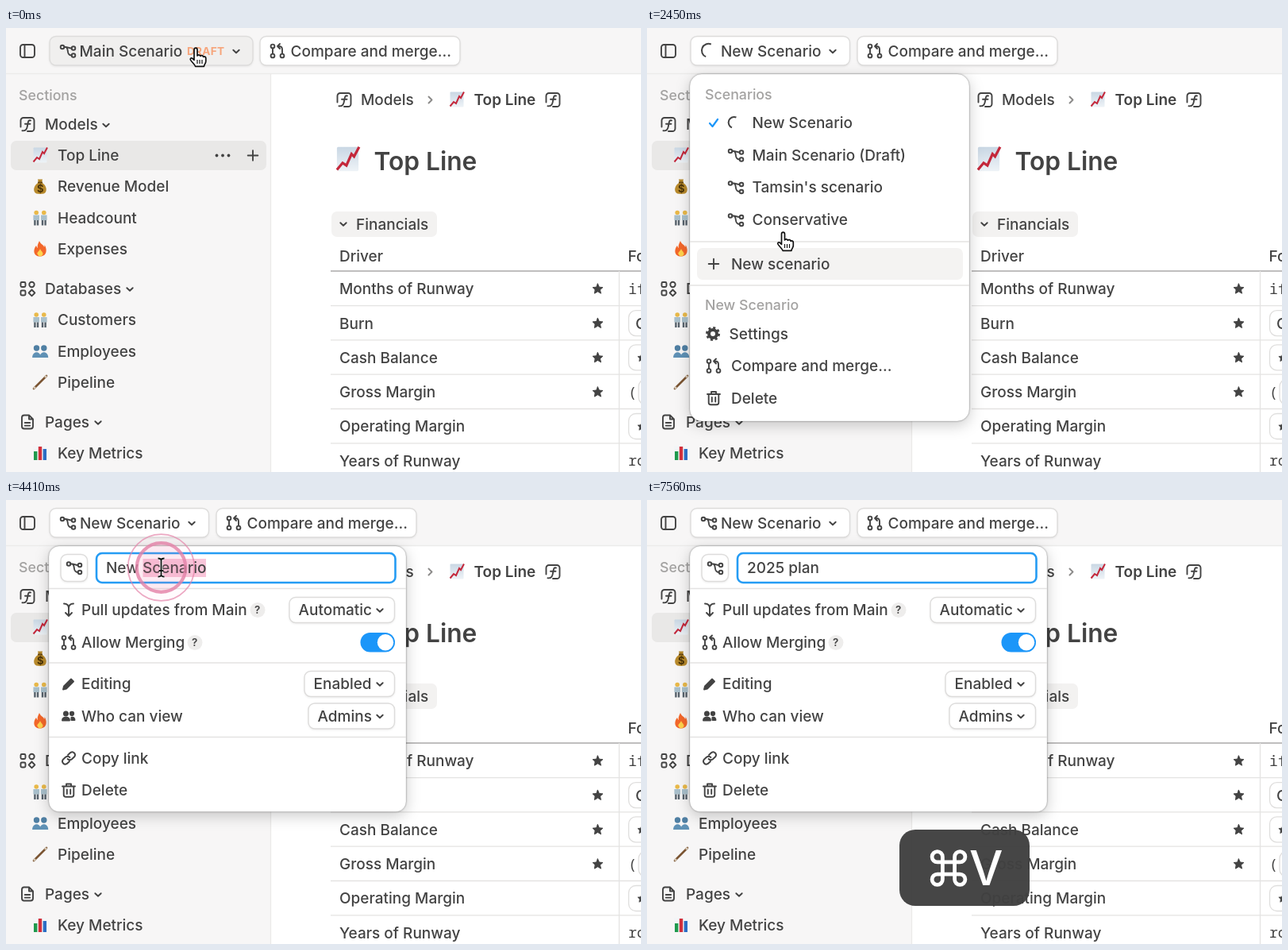
An HTML page for the animation above (8000 ms loop, 800x559 px).

```html
<!DOCTYPE html>
<html lang="en">
<head>
<meta charset="utf-8">
<title>Scenario menu</title>
<style>
  html, body { margin: 0; width: 100%; height: 100%; overflow: hidden; background: #fff; }
  svg { display: block; }
  text { font-family: Inter, sans-serif; font-weight: 500; font-optical-sizing: none; fill: #434343; white-space: pre; }
  .mono { font-family: "Noto Sans Mono", monospace; }
  .icon { fill: none; stroke: #434343; stroke-width: 1.9; stroke-linecap: round; stroke-linejoin: round; }
  .panel { fill: #fff; stroke: #00000018; filter: drop-shadow(0 0 1px #0005) drop-shadow(0 5px 9px #0003); }
  .button { fill: #fff; stroke: #dddcdb; stroke-width: 1.4; filter: drop-shadow(0 1px 1px #0001); }
</style>
</head>
<body>
<svg id="stage" width="800" height="559" viewBox="0 0 800 559"></svg>
<script>
const LOOP = 8000;
const CLICKS = [110, 1890, 4120, 4290, 4470];
const HOME = [240, 28], NEW_ROW = [172.5, 260], NAME_FIELD = [195.5, 85];

// Drawing helpers: text is placed by its left edge and the middle of its capitals.
const text = (x, y, s, size = 19, attrs = '') =>
  `<text x="${x}" y="${y + size * .364}" font-size="${size}" ${attrs}>${s}</text>`;
const label = (x, y, s) => text(x, y, s, 17.75, 'style="fill:#a3a2a1"');
const rect = (x, y, w, h, r, attrs) =>
  `<rect x="${x}" y="${y}" width="${w}" height="${h}" rx="${r}" ${attrs}/>`;
const line = (x1, y1, x2, y2, color = '#e4e3e2') =>
  `<path d="M${x1} ${y1}L${x2} ${y2}" stroke="${color}" stroke-width="1.3"/>`;
const dot = (x, y, r, attrs = '') => `<circle cx="${x}" cy="${y}" r="${r}" ${attrs}/>`;
const path = (d, attrs = '') => `<path d="${d}" ${attrs}/>`;
const at = (x, y, body, scale = 1) =>
  `<g transform="translate(${x} ${y}) scale(${scale})">${body}</g>`;
const group = (id, body) => `<g id="${id}">${body}</g>`;

const SOLID = 'fill="#434343"';
const ICONS = {
  panel: rect(-9, -8, 18, 16, 3.5, '') + path('M-3.5-8V8'),
  branch: dot(-7, -5, 2.3) + dot(7, -3.5, 2.3) + dot(7, 5.5, 2.3) +
    path('M-4.7-5H-3C0-5 1-3.5 4.5-3.5M-3-5C2-5-3 5.5 4.5 5.5'),
  merge: dot(-6, -6, 2.4) + dot(-6, 6, 2.4) + dot(6, 6, 2.4) +
    path('M-6-3.5V3.5M6 3.5V-2Q6-6 2-6H0M3-9L0-6L3-3'),
  formula: path('M-8.5 3V-5A3.5 3.5 0 0 1-5-8.5H5A3.5 3.5 0 0 1 8.5-5V5A3.5 3.5 0 0 1 5 8.5H0') +
    path('M4-5C1-6 .8-3 .3 0C-.3 4-1 8.6-6.5 7.8M-3-.8H3.5'),
  shapes: rect(-8.5, -8, 6, 6, 1.5, '') + dot(5.5, -5, 3.2) + rect(-8.5, 2.5, 6, 6, 1.5, '') +
    path('M5.5 1.5L9.3 5.5L5.5 9.3L1.7 5.5Z'),
  page: path('M2-8.5H-4Q-7-8.5-7-5.5V5.5Q-7 8.5-4 8.5H4Q7 8.5 7 5.5V-3.5ZM2-8.5V-3.5H7M-3.2 1H3.2M-3.2 4.6H3.2'),
  down: path('M-3.7-1.8L0 1.8L3.7-1.8'),
  right: path('M-2-4L2 0L-2 4', 'stroke="#8b8a89"'),
  plus: path('M-6.3 0H6.3M0-6.3V6.3'),
  check: path('M-5 .5L-1.5 4.5L5-4.5', 'stroke="#1b96f9" stroke-width="2.2"'),
  gear: dot(0, 0, 5, 'stroke-width="4"') +
    dot(0, 0, 7.5, 'stroke-width="3" stroke-dasharray="2.95 2.94" stroke-linecap="butt"'),
  trash: path('M-8-5H8M-3-5V-8H3V-5M-6.3-5V5.5Q-6.3 8.3-3.5 8.3H3.5Q6.3 8.3 6.3 5.5V-5M-2.2-1V4.5M2.2-1V4.5'),
  link: path('M-1-4L2.5-7.2A3.7 3.7 0 0 1 7.4-2L4 1.2Q1 3.4-1.4 1M1 4L-2.5 7.2A3.7 3.7 0 0 1-7.4 2L-4-1.2Q-1-3.4 1.4-1'),
  pencil: path('M-7 7L-6 3L3-6L6-3L-3 6Z', SOLID),
  people: dot(-3.5, -3, 2.6, SOLID) + dot(4, -3, 2.2, SOLID) +
    path('M-8 5.5C-8 .5 1 .5 1 5.5ZM3.4 5V2Q7.5 1 7.5 5Z', SOLID),
  pull: path('M-6-8C-2-8 0-6 0-2V7M6-8C2-8 0-6 0-2M-4 3.5L0 7.5L4 3.5'),
  star: path('M0-6.3L1.9-2.1L6.4-1.7L3 1.4L4 5.9L0 3.5L-4 5.9L-3-1.7L-3 1.4L-6.4-1.7L-1.9-2.1Z', SOLID + ' stroke-width="1"'),
};
const icon = (name, x, y, scale = 1) => at(x, y, `<g class="icon">${ICONS[name]}</g>`, scale);

const person = x => dot(x, -6.5, 2.8, 'fill="#e9b949"') +
  path(`M${x - 3.8}-3.5H${x + 3.8}V3H${x - 3.8}Z`, 'fill="#a9c0cc"') +
  path(`M${x - 1.8} 3V9.5M${x + 1.8} 3V9.5`, 'stroke="#56616b" stroke-width="2.4"');
const EMOJI = {
  chart: rect(-8.5, -9.5, 17, 19, 1, 'fill="url(#sky)"') +
    path('M-8.5 8.5L-4 3L-1 5L3-4L5-2L9-9.5', 'fill="none" stroke="#c4283b" stroke-width="2"'),
  money: path('M-3-9H3L2-5C7-2 9 3 7 7Q6 9.5 0 9.5T-7 7C-9 3-7-2-2-5Z', 'fill="#b88a2c"') +
    path('M-3-5H3', 'stroke="#6d4c13" stroke-width="2"') +
    text(-4, 2.6, '$', 13, 'style="fill:#4b3409;font-weight:700"'),
  pair: person(-4.8) + person(4.8),
  fire: path('M-1-10C1-5 5-5 5-2Q6-3 5.5-5C9 0 9 9.5 0 9.5S-9 1-5-4Q-4-1-3-1C-4-5-2-7-1-10Z', 'fill="#f3672a"') +
    path('M0 0C1 3 4 4 3.5 7Q2 9.5 0 9.5T-3.6 6.5C-4 4-1 3 0 0Z', 'fill="#ffd34d"'),
  busts: ['-4.5', '4.8'].map(x => dot(x, -4, 3.7, 'fill="#4f7fa3"') +
    path('M-5.4 8C-5.4-1 5.4-1 5.4 8Z', `transform="translate(${x} 0)" fill="#5f91b5"`)).join(''),
  stick: path('M-8 8L8-8', 'stroke="#7b5533" stroke-width="2.6" stroke-linecap="round"') +
    path('M-8 8L-6 6M6-6L8-8', 'stroke="#d9cbb8" stroke-width="2.4"'),
  bars: rect(-9, -9, 18, 18, 1, 'fill="#f3f5f7"') + rect(-8, -2, 4.4, 11, 0, 'fill="#1f9a4d"') +
    rect(-2.2, -8, 4.4, 17, 0, 'fill="#d2303c"') + rect(3.6, -5, 4.4, 14, 0, 'fill="#2c6ec4"'),
};
const emoji = (name, x, y, scale = 1) => at(x, y, EMOJI[name], scale);

function sidebar() {
  const heading = (y, name, s, chevron) =>
    icon(name, 27, y) + text(49, y, s) + icon('down', chevron, y + 1);
  const items = [
    ['chart', 160, 'Top Line'], ['money', 199.5, 'Revenue Model'], ['pair', 239, 'Headcount'],
    ['fire', 278, 'Expenses'], ['pair', 367.5, 'Customers'], ['busts', 407, 'Employees'],
    ['stick', 446, 'Pipeline'], ['bars', 535, 'Key Metrics'],
  ];
  return rect(0, 0, 800, 57, 0, 'fill="#f7f6f6"') + rect(0, 57, 333, 502, 0, 'fill="#f7f6f6"') +
    line(0, 57.5, 800, 57.5, '#ecebea') + line(333.5, 58, 333.5, 559, '#ebeae9') +
    icon('panel', 27, 29) + label(16, 85, 'Sections') +
    rect(6, 142, 322, 37, 7, 'fill="#e9e8e7"') +
    heading(121.5, 'formula', 'Models', 126) + heading(328, 'shapes', 'Databases', 156) +
    heading(496, 'page', 'Pages', 116) +
    items.map(([name, y, s]) => emoji(name, 43, y) + text(65, y, s)).join('') +
    [265.5, 273, 280.5].map(x => dot(x, 160.5, 1.9, SOLID)).join('') + icon('plus', 311, 160.5);
}

function content() {
  const drivers = ['Months of Runway', 'Burn', 'Cash Balance', 'Gross Margin', 'Operating Margin', 'Years of Runway'];
  const rowY = i => 328.3 + 43.3 * i;
  const chip = (x, y, body) => rect(x, y - 16, 60, 32, 9, 'fill="#fff" stroke="#dfdedd" stroke-width="1.3"') + body;
  const mono = (y, s) => text(784, y, s, 18, 'class="mono"');
  const formulas = [
    mono(rowY(0), 'if('),
    chip(784.5, rowY(1), text(793, rowY(1), 'Cash')),
    chip(784.5, rowY(2), icon('star', 801, rowY(2), .8)),
    mono(rowY(3), '(') + chip(797, rowY(3), ''),
    chip(784.5, rowY(4), icon('star', 801, rowY(4), .8)),
    mono(rowY(5), 'round('),
  ];
  return icon('formula', 426, 90.5) + text(447, 90.5, 'Models') + icon('right', 534.5, 90.5) +
    emoji('chart', 568, 90) + text(589.5, 90.5, 'Top Line', 19, 'style="font-weight:600"') +
    icon('formula', 689, 90.5) +
    emoji('chart', 430.5, 165, 1.6) + text(463.5, 167, 'Top Line', 31.7, 'style="font-weight:600"') +
    rect(410, 231, 133, 32, 7, 'fill="#f3f2f1"') + icon('down', 425, 247) + text(441, 247.5, 'Financials') +
    text(420, 287, 'Driver') + text(783.5, 287, 'Formula') +
    line(409, 306, 800, 306, '#aaa9a8') + line(772.5, 306, 772.5, 559) +
    drivers.map((s, i) => text(420, rowY(i), s) + formulas[i] + (i < 4 ? icon('star', 745.5, rowY(i)) : '') +
      line(409, rowY(i) + 21.3, 800, rowY(i) + 21.3)).join('');
}

const spinner = (x, y, r) => at(x, y,
  `<path class="spin" d="M${r * .2} ${-r}A${r} ${r} 0 0 1 ${r * .2} ${r}" fill="none" stroke="#434343" stroke-width="2"/>`);

function toolbar() {
  const compare = x => rect(x, 10.5, 252, 36.5, 8, 'class="button"') +
    icon('merge', x + 22, 29) + text(x + 38.5, 29, 'Compare and merge...');
  return group('barMain', rect(55, 10.5, 256, 36.5, 8, 'class="button" id="barButton"') +
      icon('branch', 78, 29) + text(92.5, 29, 'Main Scenario') +
      text(228, 29.2, 'DRAFT', 13.6, 'style="fill:#f6a57c;font-weight:700" letter-spacing=".3"') +
      icon('down', 290, 29.5) + compare(320)) +
    group('barNew', rect(55, 10.5, 200.5, 36.5, 8, 'class="button"') +
      group('barSpinner', spinner(79, 29, 8.5)) + group('barIcon', icon('branch', 78, 29)) +
      text(93, 29, 'New Scenario') + icon('down', 234, 29.5) + compare(265));
}

const row = (name, y, s, x = 84, textX = 106) => icon(name, x, y) + text(textX, y, s);
const scenario = (y, s) => row('branch', y, s, 112, 132.5);
const divider = (y, right) => line(54, y, right, y);
const highlight = (y, id = '') => rect(63, y - 20, 335, 40, 7, `fill="#f4f3f2" ${id}`);

function scenarioMenu() {
  return rect(54, 58, 352, 436, 15, 'class="panel"') + highlight(119, 'id="hover"') +
    label(73, 83.5, 'Scenarios') + icon('check', 84, 119.5) +
    scenario(119.5, 'Main Scenario (Draft)') + scenario(160, "Tamsin's scenario") + scenario(200.5, 'Conservative') +
    divider(228, 406) + row('plus', 256, 'New scenario') + divider(283.5, 406) +
    label(73, 308, 'Main Scenario (Draft)') + row('gear', 344, 'Settings', 83, 103.5) +
    row('branch', 384.5, 'Save draft as...') + row('merge', 425, 'Compare and merge...') +
    row('trash', 465.5, 'Discard draft');
}

function createdMenu() {
  return rect(54, 58, 352, 437, 15, 'class="panel"') + highlight(297) +
    label(73, 83.5, 'Scenarios') + icon('check', 84, 119.5) + spinner(111, 119.5, 7) +
    text(132.5, 119.5, 'New Scenario') + scenario(160, 'Main Scenario (Draft)') +
    scenario(200.5, "Tamsin's scenario") + scenario(241.5, 'Conservative') +
    divider(269, 406) + row('plus', 297, 'New scenario') + divider(324, 406) +
    label(73, 349, 'New Scenario') + row('gear', 385, 'Settings', 83, 103.5) +
    row('merge', 425.5, 'Compare and merge...') + row('trash', 466, 'Delete');
}

function settings() {
  const entry = (name, y, s) => row(name, y, s, 79, 95);
  const help = (x, y) => dot(x, y, 9.5, 'fill="#eeedec"') +
    text(x - 4, y, '?', 13.5, 'style="font-weight:600"');
  const select = (x, y, s) => rect(x, y - 16, 489.5 - x, 32, 8, 'class="button"') +
    text(x + 11.5, y, s) + icon('down', 471, y + .5);
  return rect(54, 58, 450, 334.5, 13, 'class="panel"') +
    rect(69, 68.5, 33.5, 34, 8, 'class="button"') + icon('branch', 86, 85.5) +
    rect(114, 67.5, 376, 36.5, 7, 'fill="#fff" stroke="#e4e3e2"') +
    rect(114, 67, 376.5, 37, 7, 'id="focus" fill="none" stroke="#259cf4" stroke-width="2.6"') +
    rect(0, 74, 0, 23, 0, 'id="selection" fill="#f9c5d9"') +
    text(126, 85.5, '', 19, 'id="fieldName"') + rect(0, 74, 1.7, 23, 0, 'id="caret" fill="#434343"') +
    divider(111.5, 504) + entry('pull', 138.5, 'Pull updates from Main') + help(317, 138.5) + select(357, 138.5, 'Automatic') +
    entry('merge', 179.5, 'Allow Merging') + help(238, 179.5) +
    rect(446.5, 167, 43.5, 24.5, 12.2, 'fill="#1b96f9"') + dot(478, 179.2, 10.2, 'fill="#fff"') +
    divider(205, 504) + entry('pencil', 231.5, 'Editing') + select(376, 231.5, 'Enabled') +
    entry('people', 272, 'Who can view') + select(381, 272, 'Admins') +
    divider(298.5, 504) + entry('link', 325, 'Copy link') + entry('trash', 365.5, 'Delete');
}

const keys = () => rect(318, 415, 164, 96, 20, 'fill="#404040f7"') +
  at(380, 463.5, path('M-8-15A7 7 0 1 0-15-8H15A7 7 0 1 0 8-15V15A7 7 0 1 0 15 8H-15A7 7 0 1 0-8 15Z',
    'fill="none" stroke="#fff" stroke-width="5"'), .95) +
  text(406, 463, 'V', 60, 'style="fill:#fff"');

const beam = 'M-4-11.5Q0-11.5 0-9Q0-11.5 4-11.5M0-9V9M-4 11.5Q0 11.5 0 9Q0 11.5 4 11.5M-2.5 4H2.5';
const cursor = () =>
  group('hand', path('M-3-.5C-3-3.8 1-3.8 1-.5V7C1.5 5.4 4.5 5.6 4.8 7.4C5.6 6 8.4 6.4 8.6 8.4C9.6 7.4 11.8 8.2 11.8 10V13.8C11.8 17 9.6 17.5 9.4 20.4H-1.4C-2 18-5 16-7.4 12.4C-8.6 10.4-6.6 9-5 10.4L-3 12.4Z',
    'fill="#fff" stroke="#111" stroke-width="1.7" stroke-linejoin="round"') +
    path('M1 12V17M4 12V17M7 12V17', 'stroke="#111" stroke-width="1.2"')) +
  group('arrow', path('M.5-1V17.5L4.6 13.7L7.4 20.6L10.6 19.3L7.8 12.6H13.5Z', 'fill="#111" stroke="#fff" stroke-width="1.5"')) +
  group('beam', path(beam, 'fill="none" stroke="#fff" stroke-width="3.6"') +
    path(beam, 'fill="none" stroke="#111" stroke-width="1.8"'));

const stage = document.getElementById('stage');
stage.innerHTML = '<linearGradient id="sky" x2="0" y2="1"><stop stop-color="#c9d7e4"/><stop offset="1" stop-color="#eef3f7"/></linearGradient>' +
  sidebar() + content() + toolbar() + group('menu', scenarioMenu()) + group('created', createdMenu()) +
  group('settings', settings()) + CLICKS.map(() => dot(0, 0, 0, 'class="ring" fill="#ea7fa8" stroke="#e482a8"')).join('') +
  group('keys', keys()) + group('cursor', cursor());

const $ = id => document.getElementById(id);
const set = (el, attrs) => { for (const k in attrs) el.setAttribute(k, attrs[k]); };
const show = (id, opacity) => set($(id), { opacity: +opacity, visibility: +opacity ? 'visible' : 'hidden' });
const popup = (id, opacity, scale) => {
  show(id, opacity);
  set($(id), { transform: `translate(54 57) scale(${scale}) translate(-54 -57)` });
};
const spins = document.querySelectorAll('.spin'), rings = document.querySelectorAll('.ring');

function draw(t) {
  const ramp = (from, to) => Math.min(1, Math.max(0, (t - from) / (to - from)));
  const smooth = p => p * p * (3 - 2 * p);
  const during = (from, to) => t >= from && t < to;
  const mix = (a, b, p) => a.map((v, i) => v + (b[i] - v) * p);

  const toRow = smooth(ramp(1150, 1540)), toField = smooth(ramp(3180, 3960));
  const [x, y] = toField ? mix(NEW_ROW, NAME_FIELD, toField) : mix(HOME, NEW_ROW, toRow);

  const created = t >= 2450, loading = t < 3110;
  show('barMain', !created);
  show('barNew', created);
  show('barSpinner', created && loading);
  show('barIcon', created && !loading);
  $('barButton').style.fill = y < 47 ? '#f0efee' : '#fff';
  spins.forEach(s => set(s, { transform: `rotate(${(t - 2800) * .45})` }));

  const opened = ramp(130, 270), swap = ramp(2730, 2870);
  popup('menu', created ? 0 : opened, .96 + .04 * opened);
  popup('created', created ? 1 - swap : 0, 1 - .04 * swap);
  popup('settings', swap, .975 + .025 * swap);
  const hovered = y < 140 ? 119 : y < 180 ? 160 : y < 228 ? 200.5 : 256;
  set($('hover'), { y: hovered - 20 });

  const pasted = t >= 7060, all = t >= 4520;
  show('focus', ramp(2810, 2950));
  set($('selection'), { x: all ? 126 : 172.5, width: all ? 126 : 79.5 });
  show('selection', during(4330, 7060));
  $('fieldName').textContent = pasted ? '2025 plan' : 'New Scenario';
  set($('caret'), { x: pasted ? 216 : 251.5 });
  show('caret', during(2730, 3300) || during(3800, 4120) || during(7060, 7560));

  rings.forEach((ring, i) => {
    const p = (t - CLICKS[i]) / 340, live = p >= 0 && p < 1;
    const [cx, cy] = i ? (i > 1 ? NAME_FIELD : NEW_ROW) : [240, 27];
    set(ring, live ? { cx, cy, r: 42 * (1 - (1 - p) ** 3), opacity: .9 - .25 * p,
      'stroke-width': 1 + 5 * (1 - p), 'fill-opacity': .25 * (1 - p) } : { opacity: 0 });
  });

  const overField = toField > 0 && y < 105;
  set($('cursor'), { transform: `translate(${x} ${y})` });
  show('hand', t < 2660);
  show('arrow', t >= 2660 && !overField);
  show('beam', overField ? 1 - ramp(6370, 6510) : 0);
  show('keys', ramp(6850, 7030));
}

function frame() {
  draw(performance.now() % LOOP);
  requestAnimationFrame(frame);
}
frame();
</script>
</body>
</html>
```
